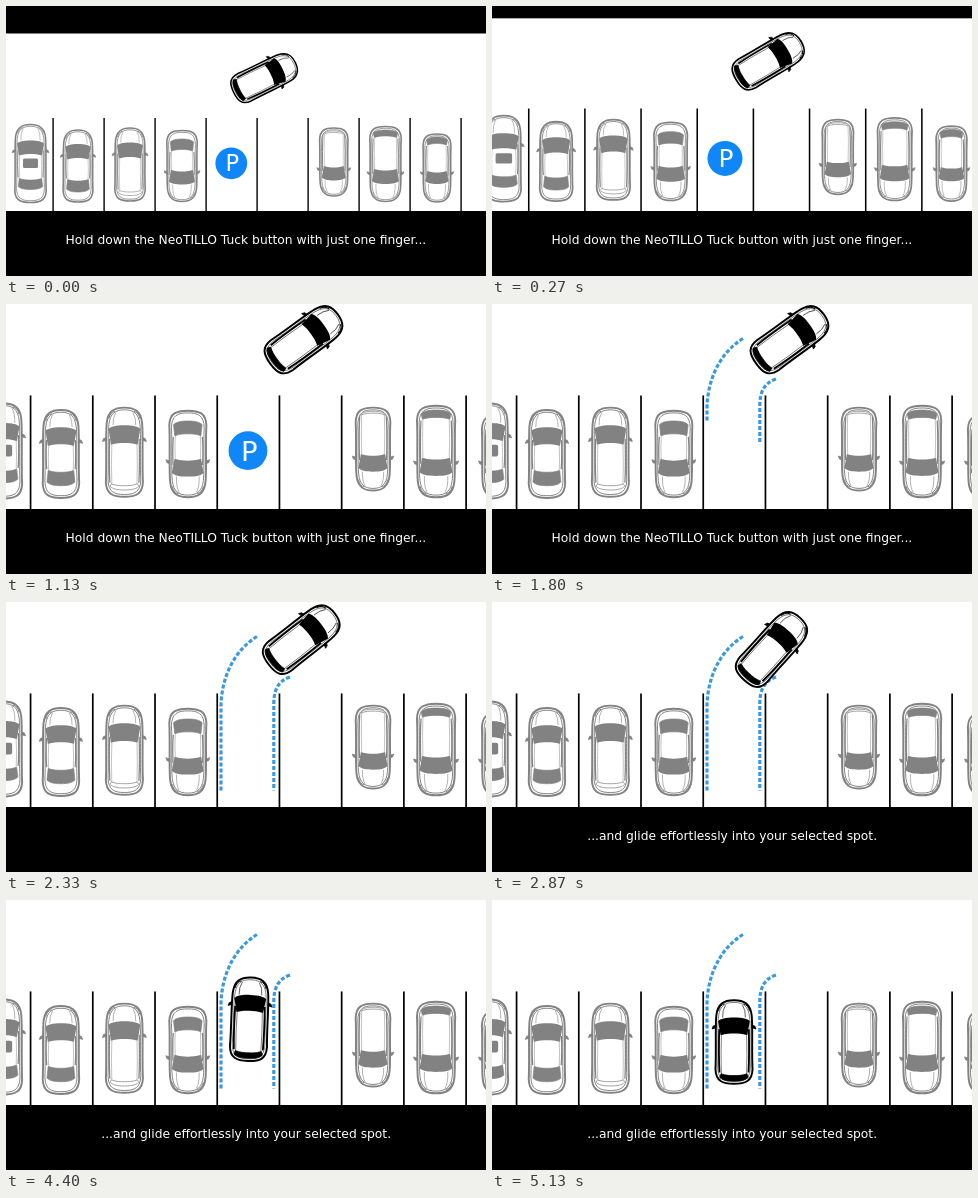
An HTML page that plays this animation: 480x270 px, repeating every 5190 ms.

```html
<!DOCTYPE html>
<html lang="en">
<head>
<meta charset="utf-8">
<title>Parking assist</title>
<style>
  html, body { margin: 0; width: 100%; height: 100%; overflow: hidden; background: #fff; }
  svg { display: block; width: 100vw; height: 100vh; }
  text { fill: #fff; text-anchor: middle; font-family: "DejaVu Sans", sans-serif; }
  .caption { font-size: 12.3px; }
</style>
</head>
<body>
<svg id="stage" viewBox="0 0 480 270">
  <rect width="480" height="270" fill="#fff"/>
  <g id="lot">
    <g id="bays" stroke="#000" stroke-width="1.4"></g>
    <g id="parked"></g>
    <g id="spot">
      <circle cx="225.3" cy="157.3" r="15.9" fill="#0f87f8"/>
      <text x="226.3" y="165.4" font-size="22.5">P</text>
    </g>
  </g>
  <g id="guides" fill="none" stroke="#3b9ade" stroke-width="3.2">
    <path d="M251 34.5C229 48 215.5 74 215 104V188.5"/>
    <path d="M284 75C272 79 267.8 88 267.8 102V188.5"/>
  </g>
  <g id="hero"></g>
  <rect id="band" width="480" fill="#000"/>
  <rect y="205" width="480" height="65" fill="#000"/>
  <text id="first" class="caption" x="239.9" y="238">Hold down the NeoTILLO Tuck button with just one finger...</text>
  <text id="second" class="caption" x="240.2" y="238">...and glide effortlessly into your selected spot.</text>
</svg>
<script>
const LOOP = 5190, STEP = 1000 / 15;
const $ = id => document.getElementById(id);
const ramp = (t, a, b) => Math.min(1, Math.max(0, (t - a) / (b - a)));

// Closed curve from its right half, mirrored about x = 0
function sym(...p) {
  const left = p.slice(0, -1).reverse().map(([x, y]) => [-x, y]);
  return `M${p[0]}C${[...p.slice(1), ...left].join(' ')}Z`;
}

function body(a, b) {
  return sym([0, -b], [.55 * a, -b], [.86 * a, 3 - b], [.93 * a, 12 - b],
    [a, 20 - b], [.93 * a, b - 26], [.98 * a, b - 12],
    [.96 * a, b - 2], [.6 * a, b], [0, b]);
}

// Window pane: outer edge y0 with half width w0, inner edge y1 with half width w1
function glass(y0, y1, w0, w1) {
  const d = Math.sign(y1 - y0), inner = y1 - d * 1.5;
  return sym([0, y0], [.55 * w0, y0], [w0 - 2, y0 + d], [w0, y0 + d * 3],
    [w0, y0 + d * 3], [w1, y1], [w1, y1],
    [.6 * w1, inner], [.3 * w1, inner], [0, inner]);
}

function car({ len, w, shield, rear, mirror, ink, hollow, sunroof, strips }) {
  const a = w / 2, b = len / 2, [s0, s1] = shield, [r0, r1] = rear, mid = (s1 + r1) / 2;
  const line = (d, width) => `<path d="${d}" fill="none" stroke="${ink}" stroke-width="${width}"/>`;
  const half = `<path d="M${a - .8} ${mirror - 1}l2.4 .9 .9 2.4 -3.3 -1z" fill="${ink}" stroke="${ink}" stroke-width=".6"/>`
    + line(`M${a - 3.4} ${s1 - 5}Q${a - 2.8} ${mid} ${a - 3.6} ${r1 - 1}`, strips ? 1.5 : 1)
    + line(`M${a - 5.2} ${s1}Q${a - 4.6} ${mid} ${a - 5.2} ${r1}`, .4)
    + line(`M${a * .6} ${s0}Q${a * .62} ${-b + 8} ${a * .45} ${-b + 4}`, .5)
    + line(`M${a * .82} ${-b + 9}Q${a * .76} ${-b + 4} ${a * .5} ${-b + 3}`, .8);
  return `<path d="${body(a, b)}" fill="#fff" stroke="${ink}" stroke-width="1.6"/>`
    + line(body(a - 1.8, b - 1.8), strips ? .4 : .8)
    + half + `<g transform="scale(-1 1)">${half}</g>`
    + `<path d="${glass(s0, s1, a - 2.5, a - 4.6)}" fill="${ink}"/>`
    + `<path d="${glass(r0, r1, a - 3.8, a - 4.8)}" fill="${hollow ? '#fff' : ink}" stroke="${ink}" stroke-width=".6"/>`
    + (sunroof ? `<rect x="-7.5" y="-5" width="15" height="9.5" rx="1.5" fill="${ink}"/>` : '');
}

const parked = [
  { x: 24.5, y: 157.5, len: 78, w: 32, shield: [-23, -8], rear: [26, 15], mirror: -13, sunroof: true },
  { x: 72, y: 160, len: 72, w: 30.5, shield: [-22, -6.5], rear: [26, 13.5], mirror: -11 },
  { x: 124, y: 158.5, len: 73, w: 31, shield: [-22, -6], rear: [31, 26], mirror: -11, hollow: true },
  { x: 176, y: 160, len: 71, w: 31, shield: [-18.5, -4], rear: [27, 15], mirror: -7, flip: true },
  { x: 327.8, y: 156, len: 68, w: 29, shield: [-18.5, -4], rear: [31, 28], mirror: -8, flip: true, hollow: true },
  { x: 379.5, y: 158, len: 75, w: 32, shield: [-20, -5], rear: [34, 26.5], mirror: -10, flip: true },
  { x: 431, y: 162, len: 68, w: 28.5, shield: [-16, -3], rear: [31, 23], mirror: -6, flip: true }
];
$('parked').innerHTML = parked.map(c =>
  `<g transform="translate(${c.x} ${c.y}) rotate(${c.flip ? 180 : 0})">${car({ ...c, ink: '#828282' })}</g>`).join('');
$('hero').innerHTML = car({ len: 68.5, w: 31, shield: [-20, -5.5], rear: [32, 26], mirror: -13, ink: '#000', strips: true });
$('bays').innerHTML = Array.from({ length: 9 }, (_, i) =>
  `<path d="M${47.1 + 51 * i} 112V206"/>`).join('');

const guides = [...$('guides').children].map(el => ({ el, len: el.getTotalLength() }));

// Reversing manoeuvre: time, x, y, rotation
const route = [
  [2070, 298, 35, 54], [2333, 295.8, 37, 52], [2870, 280, 47, 42],
  [3467, 256.5, 70, 26.6], [3930, 247, 91, 13], [4400, 243.5, 119.3, 2.2],
  [5000, 242.2, 140, .2], [5133, 242, 142, 0]
];

function slope(i, k) {
  const a = route[Math.max(0, i - 1)], b = route[Math.min(route.length - 1, i + 1)];
  return (b[k] - a[k]) / (b[0] - a[0]);
}

function reverse(t) {
  const end = route.length - 1;
  if (t <= route[0][0]) return route[0].slice(1);
  if (t >= route[end][0]) return route[end].slice(1);
  const i = route.findIndex(r => r[0] > t) - 1;
  const p = route[i], q = route[i + 1], dt = q[0] - p[0], u = (t - p[0]) / dt, v = 1 - u;
  return [1, 2, 3].map(k =>
    v * v * (1 + 2 * u) * p[k] + u * u * (3 - 2 * u) * q[k]
    + u * v * dt * (v * slope(i, k) - u * slope(i + 1, k)));
}

function draw(ms) {
  const t = Math.floor((ms + 4) / STEP) * STEP;
  const zoom = 1 - Math.pow(1 - ramp(t, 0, 1070), 2.15);
  const scale = 1 + .22 * zoom;

  $('lot').setAttribute('transform', `translate(149.5 205.5) scale(${scale}) translate(-149.5 -205.5)`);
  $('band').setAttribute('height', Math.max(0, 27.5 - 150 * (scale - 1)));
  $('spot').setAttribute('opacity', 1 - ramp(t, 1267, 1533));

  const grown = ramp(t, 1267, 2200);
  for (const { el, len } of guides) {
    el.setAttribute('visibility', grown ? 'visible' : 'hidden');
    el.setAttribute('stroke-dasharray', '4 2 '.repeat(Math.ceil(len * grown / 6)) + '0 999');
  }

  const [x, y, turn] = t < 1100
    ? [258.5 + 39.5 * zoom, 71.5 - 36.5 * zoom, 64 - 10 * zoom]
    : reverse(t);
  $('hero').setAttribute('transform', `translate(${x} ${y}) rotate(${turn}) scale(${scale})`);

  $('first').setAttribute('opacity', 1 - ramp(t, 1800, 2070));
  $('second').setAttribute('opacity', ramp(t, 2335, 2600));
}

const start = performance.now();
function tick() {
  draw((performance.now() - start) % LOOP);
  requestAnimationFrame(tick);
}
tick();
</script>
</body>
</html>
```
